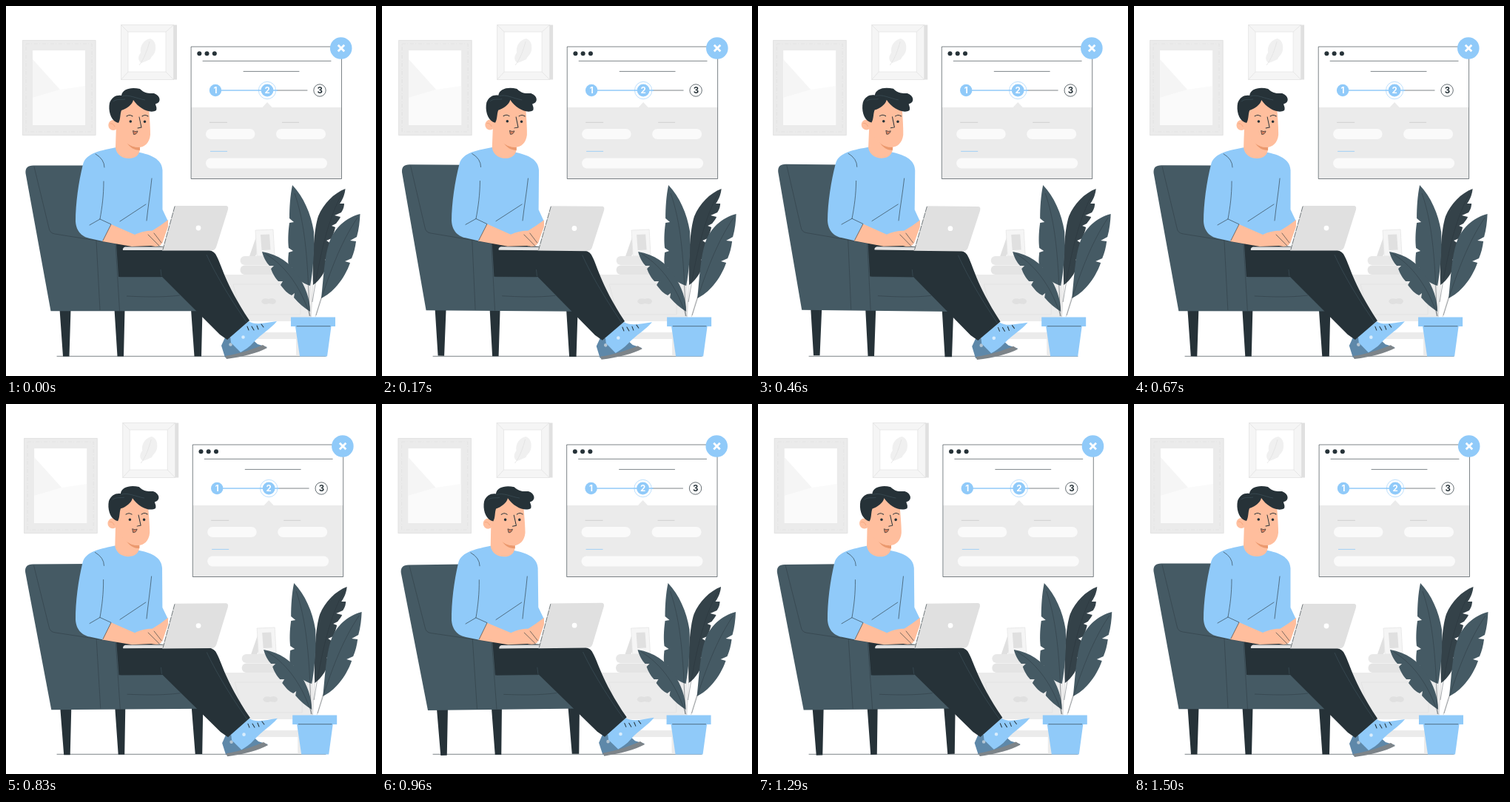
Write an HTML page that moves like this. It is 500x500 px and loops after 1540 ms.

```html
<!DOCTYPE html>
<html lang="en">
<head>
<meta charset="utf-8">
<title>Man with laptop</title>
<style>
html, body { margin: 0; width: 100%; height: 100%; overflow: hidden; background: #fff; }
svg { display: block; width: 100vw; height: 100vh; }
text { font: 700 11.5px Inter, Roboto, sans-serif; text-anchor: middle; }
.ink { fill: #263238; }
.blue { fill: #90caf9; }
.slate { fill: #455a64; }
.skin { fill: #ffbe9d; }
.g1 { fill: #ebebeb; }
.g2 { fill: #e0e0e0; }
.g3 { fill: #fafafa; }
.white { fill: #fff; }
.line { fill: none; stroke: #263238; stroke-width: .6; stroke-linecap: round; stroke-linejoin: round; }
.soft { fill: none; stroke: #e0e0e0; stroke-width: .7; }
.rib { fill: none; stroke: #263238; stroke-width: .4; }
</style>
</head>
<body>
<svg viewBox="0 0 500 500">
  <path class="line" d="M69 473.3H432"/>

  <g id="room">
    <g id="pictures">
      <path class="g1" d="M22 46H121.5V175H22Z"/>
      <path class="soft" d="M22.4 46.4H121V174.6H22.4Z"/>
      <path class="soft" stroke-dasharray="5 2 1 3" d="M27 51H116V170H27Z"/>
      <path class="white" d="M36 60H107V161H36Z"/>
      <path class="g3" d="M36 124L73 113 107 108V161H36Z"/>
      <path fill="#f5f5f5" d="M36 72L73 113 36 124Z"/>
      <path class="g2" d="M226 25.5H231V99.5H226Z"/>
      <path fill="#f5f5f5" stroke="#e0e0e0" stroke-width=".7" d="M155.5 25.5H226.5V99.5H155.5Z"/>
      <path class="soft" d="M155.5 25.5L165 35M226.5 25.5L216 35M155.5 99.5L165 89M226.5 99.5L216 89"/>
      <path class="white" stroke="#e0e0e0" stroke-width=".6" d="M165 35H216V89H165Z"/>
      <path fill="#f0f0f0" d="M183 77C178 74 178 68 182 63 180 54 187 45 195 44 200 46 203 51 202 59 201 66 196 68 195 72 191 74 188 75 183 77Z"/>
      <path class="soft" d="M180 80C187 71 191 59 194 48"/>
    </g>

    <g id="window">
      <path class="white" d="M250.5 55H453.5V233.5H250.5Z"/>
      <path class="g1" d="M250.5 137H453.5V233.5H250.5ZM346 137.5L353 130 360 137.5Z"/>
      <path class="line" d="M250.5 55H453.5V233.5H250.5ZM266 74.3H439M321 88.4H396"/>
      <g class="ink"><circle cx="261.3" cy="64.3" r="3"/><circle cx="271.5" cy="64.3" r="3"/><circle cx="281.8" cy="64.3" r="3"/></g>
      <circle class="blue" cx="452.7" cy="57" r="14.8"/>
      <path d="M448.7 52.7L457.2 61.2M457.2 52.7L448.7 61.2" stroke="#fff" stroke-width="2.8"/>
      <path class="line" d="M366 114H407"/>
      <path d="M290 114H367" stroke="#90caf9" stroke-width="1.6"/>
      <circle cx="353" cy="114" r="11.7" fill="#fff" stroke="#90caf9" stroke-width=".6"/>
      <path d="M341 114H365" stroke="#90caf9" stroke-width="1.6"/>
      <g class="blue"><circle cx="283" cy="114" r="8.2"/><circle cx="353" cy="114" r="8.4"/></g>
      <circle class="white" cx="424" cy="114" r="8.2" stroke="#263238" stroke-width=".7"/>
      <text class="white" x="283" y="118.1">1</text>
      <text class="white" x="353" y="118.1">2</text>
      <text class="ink" x="424.3" y="118.1">3</text>
      <path d="M275 157.3H299M373 157.3H396" stroke="#c4c4c4" stroke-width=".7"/>
      <path d="M276 196.4H299" stroke="#90caf9" stroke-width=".8"/>
      <g class="g3">
        <rect x="270" y="166" width="66.5" height="14" rx="7"/>
        <rect x="365" y="166" width="67" height="14" rx="7"/>
        <rect x="270" y="205.5" width="164" height="14" rx="7"/>
      </g>
    </g>

    <g id="dresser">
      <path class="g1" d="M285 363H413V426H285ZM300 441H396V450H300ZM392 426H412V441L398 473H392Z"/>
      <path class="white" d="M398 426H412V473H398Z"/>
      <path class="soft" d="M307 376H398V417H318Z"/>
      <path class="g2" d="M345 399C347 394 352 395 355 396 359 394 364 395 365 399 364 404 359 403 355 402 351 404 346 403 345 399Z"/>
      <path class="g2" d="M338 312L329 338H337L343 326Z"/>
      <path fill="#f5f5f5" stroke="#e6e6e6" stroke-width=".8" d="M337 303L361 302 363 338H339Z"/>
      <path class="g2" d="M344 309L356 308.5 357.500 329.500 345.500 330Z"/>
      <rect fill="#e8e8e8" x="316.5" y="338" width="50" height="12" rx="6"/>
      <rect fill="#e4e4e4" x="316.5" y="350.5" width="50" height="12.500" rx="6"/>
    </g>

    <g id="plant">
      <path d="M408 375L411 420M415 375L412 420M426 393L418 420" fill="none" stroke="#dcdcdc" stroke-width="1.2"/>
      <path fill="#344249" d="M458.500 247C443 253 429 267 422 284 416 302 414 340 415 377 425 370 432 358 435 346L431 343 437 339C439 332 440 326 439 321L433 317 440 314C442 309 444 304 445 299L440 297 446 294C448 291 451 288 452 285L444 283 453 279C456 275 457 270 457 267L451 267C456 260 458 253 458.500 247Z"/>
      <path class="slate" d="M387 242C384 256 383 273 383 287L389 292 383 293C381 307 381 319 382 327L388 331 382 333C381 342 381 347 382 351L387 354 384 357C391 368 401 375 411 378 415 358 417 331 416 305 412 280 402 258 387 242Z"/>
      <path class="slate" d="M478.500 281C459 286 444 300 437 319 430 340 429 367 426 395 441 388 457 370 465 347L458 345 467 341C470 334 472 326 473 318L465 317 474 312C477 302 478 291 478.500 281Z"/>
      <path class="slate" d="M346 332C348 340 352 347 356 351L362 351 358 355C360 361 364 368 368 372L374 372 371 377C376 384 381 389 386 391L390 388 389 394C396 402 403 408 411 413 411 396 405 380 394 363 384 347 368 336 346 332Z"/>
      <path class="rib" d="M390 253C402 288 408 330 410 419M455 252C436 286 425 330 414 400M475 286C452 320 437 360 419 418M351 335C380 353 399 382 411 419"/>
      <path class="blue" d="M385 420.500H445V433H385ZM391 433H439.500L434 473.500H397Z"/>
      <path class="line" d="M393 432.700H438"/>
    </g>
  </g>

  <g id="seated">
    <g id="chair">
      <path class="ink" d="M72.500 410H87.500L85.500 473.500H77ZM146.500 410H160.500L159 473.500H150.500ZM250 410H265.500L264 473.500H254.500Z"/>
      <path class="slate" d="M26.500 226C26 219 29 215.500 37 215.500H112L150 320 210 340 268 395 264 412.300H60.500Z"/>
      <path class="rib" d="M38 217L58 300Q59 307 66 308L148 321 153.500 412M122 317L127 411M154 366H210M163 392C185 393 210 394 235 391"/>
    </g>

    <g id="legs">
      <path fill="#5e88a9" d="M296 448L291 459 296 475C315 472 336 468 353 461L340 457 330 448Z"/>
      <path fill="#7d8489" d="M296 473L298 477C320 474 340 469 353 462L347 458C333 464 315 470 296 473Z"/>
      <circle cx="303.500" cy="457.500" r="2.300" fill="#b4c5d2"/>
      <path class="blue" d="M303 446L328 426C337 432 351 428 366 426 358 436 345 443 334 455 329 461 322 465 317 468L304 455Z"/>
      <path d="M326 433L328 438M332 433L335 438M339 432L341 437M345 430L348 434" fill="none" stroke="#263238" stroke-width="1" stroke-linecap="round"/>
      <circle cx="320.500" cy="447.500" r="2.300" fill="#d9edfd"/>
      <path class="ink" d="M149 321L152 366H211L289 444 299 451 329 425C294 372 292 350 283 335Q279 330 270 329L170 322Z"/>
      <path d="M209 356L210 365M271 336C281 358 299 390 325 427" fill="none" stroke="#455a64" stroke-width=".5"/>
    </g>

    <g id="body">
      <path class="blue" d="M149 191C130 195 108 198 104 214 98 238 94 267 94 291 95 306 104 312 113 314L131 318 143 315 211 306 219 291 211.500 275V222C211 209 200 202 181 198Z"/>
      <path class="skin" d="M219 289L208 297 197 304 211 321 219 298Z"/>
      <path class="skin" d="M142 295L174 309C184 304 194 303 201 304 207 306 211 315 210 322 206 326 200 325 196 324L170 325 130 318Z"/>
      <path class="line" d="M121 200Q133 207 133 218M132 237C132 256 130 271 127 288L113 296M127 288L142 295 131 317M154 291L189 268M197 233C195 253 192 271 190 290M192 309L207 324M200 307L210 320"/>
    </g>

    <g id="laptop">
      <path class="g2" d="M161 325.500H216V330H158Q157 327 161 325.500ZM228 270H297Q301 270 300 275L284 326Q282 330.500 277 330.500H211Z"/>
      <path class="line" stroke-dasharray="7 2" d="M228 271L212 329"/>
      <circle class="white" cx="260" cy="300" r="3.400"/>
    </g>

    <g id="head">
      <path class="skin" d="M149 160L148 192C150 202 158 206 166 206 175 206 181 201 181 192V182Z"/>
      <path fill="#eb996e" d="M163 184C168 190 174 191 181 191V195C173 195 167 191 163 184Z"/>
      <path class="skin" d="M150 124L186 122 193 138C194 150 195 164 195 174 194 185 187 191 179 191 165 190 155 181 150 166Z"/>
      <ellipse class="skin" cx="145" cy="161" rx="6.700" ry="7"/>
      <path class="line" d="M141 159Q145 158 147 163" style="stroke:#eb996e"/>
      <path class="ink" d="M149 157C141 153 138 141 140 131 143 123 149 120 156 121 157 112 169 109 181 112 188 119 194 118 200 118 209 121 210 130 203 132 200 132 205 136 203 141 195 146 180 139 172 127 171 133 163 139 156 141 154 146 155 153 152 158Z"/>
      <path d="M157 122C166 119 176 125 188 127M145 129C150 125 155 127 161 126" fill="none" stroke="#455a64" stroke-width=".5"/>
      <g class="ink"><circle cx="168.300" cy="156" r="1.800"/><circle cx="187.500" cy="156.300" r="1.800"/></g>
      <path class="line" style="stroke-width:1" d="M163 149Q167 146 171 149M184 149Q188 146 192 149M180 150L183 164 178 165"/>
      <path fill="#d87f5c" stroke="#263238" stroke-width=".7" d="M171.500 168.500Q175 170.500 178 169 176.500 174 172.500 173.500Z"/>
    </g>
  </g>
</svg>
<script>
const LOOP = 1540, PERIOD = 1500, FPS = 24, LEAD = 29;
const LAST_STEP = PERIOD * FPS / 1000;
const SHAKE = [0, -1, 2, -4, 4, -4, 4, -4, 2, -1, 0];
const room = document.getElementById('room');
const seated = document.getElementById('seated');

function shake(p) {
  const i = Math.floor(p * 10);
  return SHAKE[i] + (SHAKE[i + 1] - SHAKE[i]) * (p * 10 - i);
}

// Degrees: up to 1, down to -1, back to 0.
function rock(p) {
  if (p < .25) return p * 4;
  return p < .75 ? 2 - p * 4 : p * 4 - 4;
}

function draw(now) {
  const t = now % LOOP;
  const step = Math.min(LAST_STEP, Math.floor((t + 5) * FPS / 1000));
  const p = (step * 1000 / FPS + LEAD) / PERIOD % 1;
  room.setAttribute('transform', `translate(${shake(p) + .2} 0)`);
  seated.setAttribute('transform', `rotate(${rock(p) - .08} 195 292)`);
  requestAnimationFrame(draw);
}
draw(0);
</script>
</body>
</html>
```
